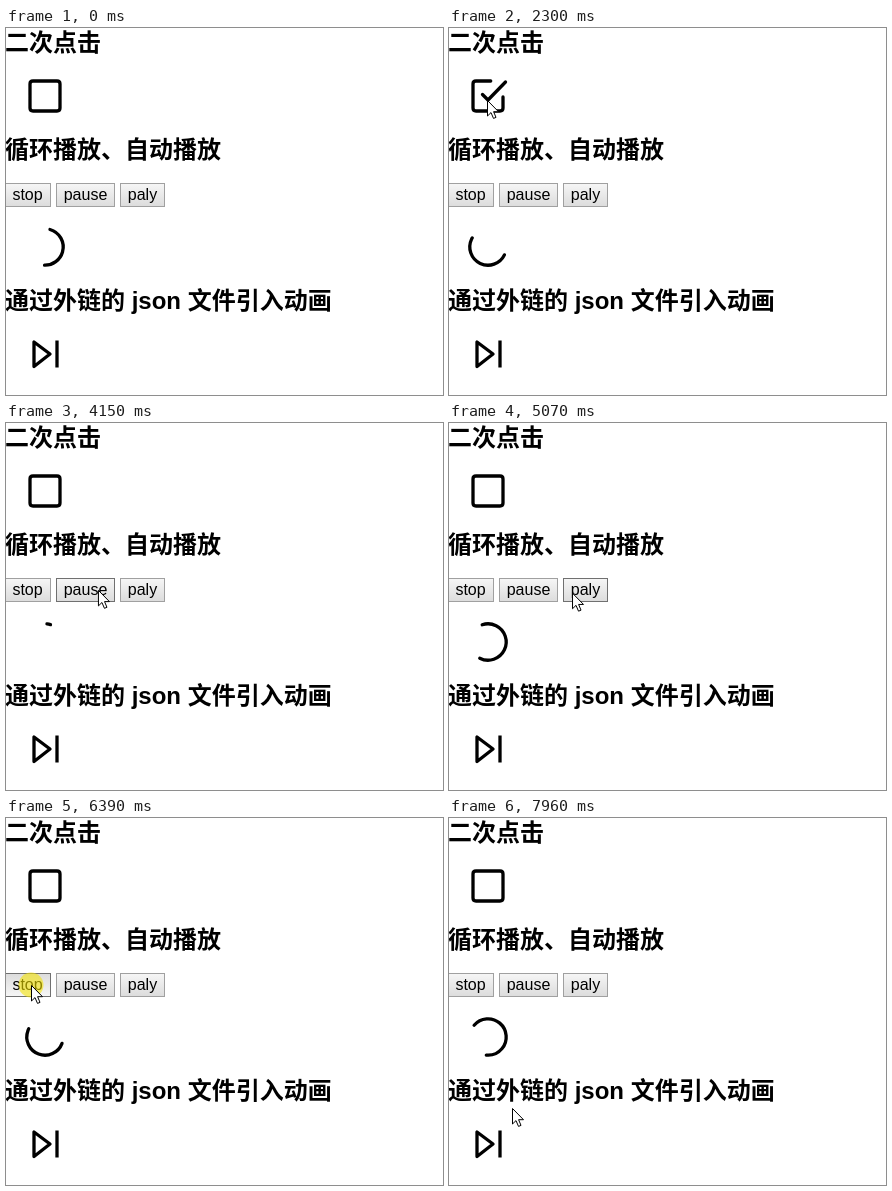
These frames come from a looping animation (437 by 367 pixels, 8000 ms). An HTML page:

```html
<!DOCTYPE html>
<html lang="zh">
<head>
<meta charset="utf-8">
<style>
  html, body { margin: 0; height: 100%; overflow: hidden; background: #fff; }
  svg { display: block; }
  text { font: 16px "Liberation Sans", "Noto Sans CJK SC", "Noto Sans CJK", sans-serif; }
  .head { font-size: 24px; font-weight: bold; }
  .line { fill: none; stroke: #000; stroke-width: 3.3; stroke-linejoin: round; }
  .round { stroke-linecap: round; }
</style>
</head>
<body>
<svg width="437" height="367" viewBox="0 0 437 367">
  <defs>
    <linearGradient id="face" x2="0" y2="1">
      <stop stop-color="#f6f6f6"/><stop offset="1" stop-color="#dcdcdc"/>
    </linearGradient>
    <linearGradient id="pressed" x2="0" y2="1">
      <stop stop-color="#dcdcdc"/><stop offset="1" stop-color="#f6f6f6"/>
    </linearGradient>
  </defs>
  <text class="head" x="-1" y="23">二次点击</text>
  <text class="head" x="-1" y="130">循环播放、自动播放</text>
  <text class="head" x="-1" y="281">通过外链的 json 文件引入动画</text>

  <path class="line round" id="box" pathLength="1" d="M54 69V80Q54 83 51 83H27Q24 83 24 80V56Q24 53 27 53H51Q54 53 54 56V69"/>
  <path class="line round" id="tick" pathLength="1" d="M33.5 66.5L39 72L56.5 54"/>

  <g id="buttons"></g>
  <circle class="line round" id="arc" cx="39" cy="219" r="18.2" pathLength="360"/>
  <path class="line" d="M28 314V338.5L44 326ZM51 312.5V339.5"/>

  <circle id="glow" r="12.5" fill="#f4e400" fill-opacity=".58"/>
  <path id="cursor" fill="#fff" stroke="#000" d="M.5 .5V16L4 12.6L6.5 18.4L9 17.4L6.6 11.7H11.5Z"/>
</svg>
<script>
const LOOP = 8000;
const $ = id => document.getElementById(id);
const clamp = v => Math.min(1, Math.max(0, v));
const ramp = (t, from, to) => clamp((t - from) / (to - from));
const mix = (a, b, u) => a + (b - a) * u;
const show = (el, on) => el.setAttribute('visibility', on ? 'visible' : 'hidden');

const buttons = [['stop', -2, 47], ['pause', 50, 59], ['paly', 114, 45]].map(([name, x, w]) => {
  $('buttons').insertAdjacentHTML('beforeend',
    `<rect x="${x + .5}" y="155.5" width="${w - 1}" height="23"/>
     <text x="${x + w / 2}" y="172" text-anchor="middle">${name}</text>`);
  return { x, w, face: $('buttons').querySelector('rect:last-of-type') };
});

// Pointer moves: start, end, x, y
const ENTER = 760;
const moves = [
  [ENTER, 1300, 57, 68], [1500, 1700, 38, 72], [3700, 4200, 92, 167], [5000, 5220, 137, 171],
  [5980, 6230, 25, 167], [6710, 7300, 138, 167], [7500, 7960, 63, 290]
];
const clicks = [1720, 3180, 4520, 5750, 6310, 7330];

function pointer(t) {
  let x = 328, y = 321;
  for (const [from, to, toX, toY] of moves) {
    const u = 1 - (1 - ramp(t, from, to)) ** 3;
    x = mix(x, toX, u);
    y = mix(y, toY, u);
  }
  return [x, y];
}

// One spin: time, tail angle, head angle
const spin = [
  [0, 0, 0], [170, 10, 185], [500, 305, 550], [1025, 470, 665], [1250, 590, 730], [2185, 740, 805]
];
function arcAt(phase) {
  const i = Math.max(1, spin.findIndex(k => k[0] >= phase));
  const a = spin[i - 1], b = spin[i], u = ramp(phase, a[0], b[0]);
  return [mix(a[1], b[1], u), mix(a[2], b[2], u)];
}

// Time within the spin: two plain loops, then pause, play, stop and play again.
function spinPhase(t) {
  if (t < 1275) return t + 170;
  if (t < 4130) return t - 1275;
  if (t < 5980) return Math.min(t, 4730) - 4130;
  if (t < 6470) return t - 5980 + 600;
  return Math.max(0, t - 7460);
}

function trim(el, length, total) {
  show(el, length > 0);
  el.setAttribute('stroke-dasharray', `${length} ${total * 2}`);
}

function draw(t) {
  const [x, y] = pointer(t);
  const down = clicks.some(c => t >= c && t < c + 230);
  show($('cursor'), t >= ENTER);
  $('cursor').setAttribute('transform', `translate(${x} ${y})`);
  show($('glow'), down);
  $('glow').setAttribute('cx', x);
  $('glow').setAttribute('cy', y);

  for (const b of buttons) {
    const over = x >= b.x && x < b.x + b.w && y >= 155 && y < 179;
    b.face.setAttribute('stroke', over ? '#707070' : '#a0a0a0');
    b.face.setAttribute('fill', over && down ? 'url(#pressed)' : 'url(#face)');
  }

  const phase = spinPhase(t);
  const [tail, head] = arcAt(Math.min(phase, 2185));
  // Round caps reach about five degrees past each end.
  trim($('arc'), Math.max(0, head - tail - 10), 360);
  $('arc').setAttribute('transform', `rotate(${tail - 85} 39 219)`);
  $('arc').setAttribute('stroke-opacity', 1 - ramp(phase, 2000, 2310));

  const checked = ramp(t, 1800, 2250) - ramp(t, 3260, 3800);
  trim($('box'), 1 - .235 * clamp(checked / .4), 1);
  trim($('tick'), clamp((checked - .3) / .7), 1);
}

const start = performance.now();
function frame(now) {
  draw(Math.max(0, now - start) % LOOP);
  requestAnimationFrame(frame);
}
draw(0);
requestAnimationFrame(frame);
</script>
</body>
</html>
```
